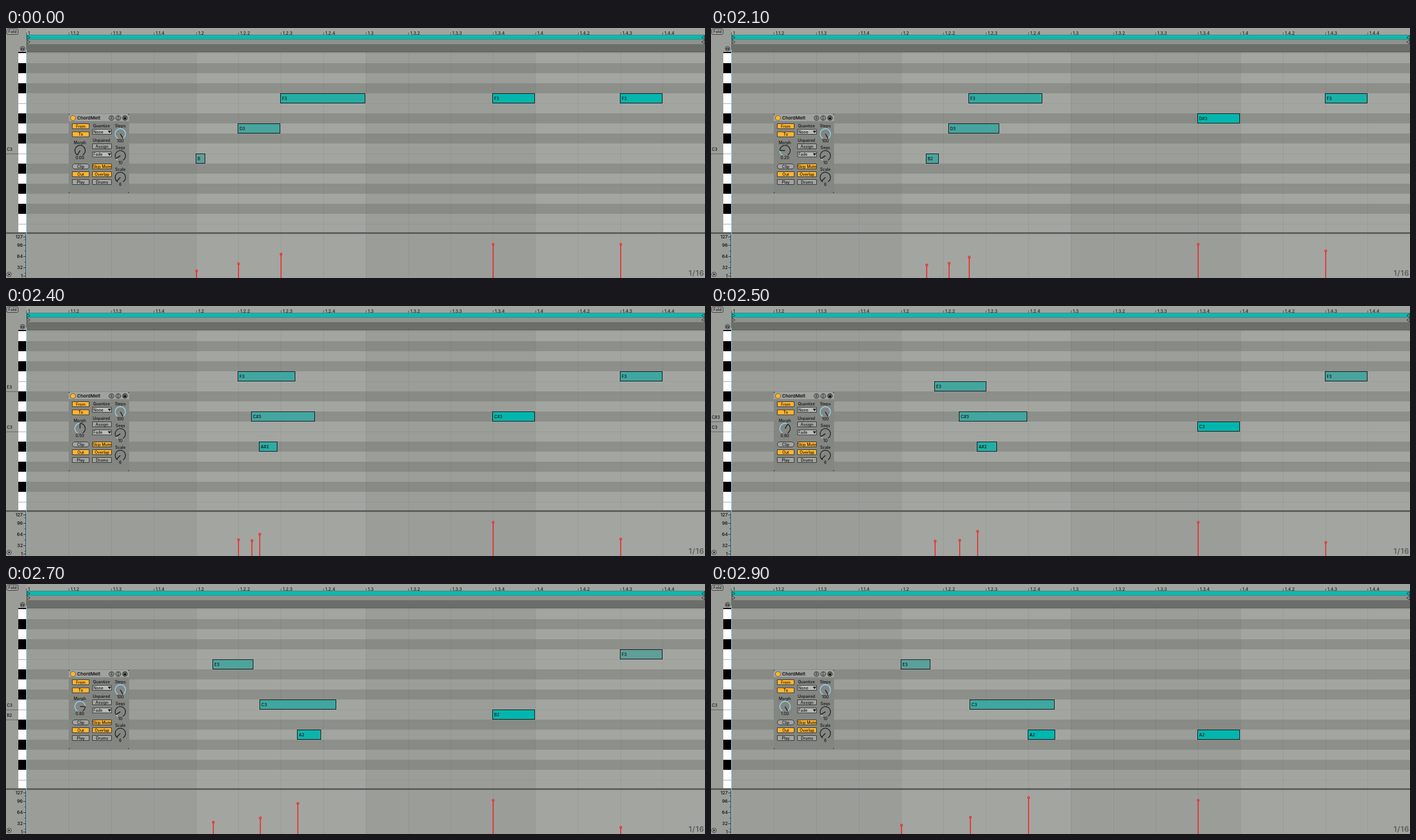
These frames come from a looping animation (1249 px wide and 448 px high, 5900 ms). An HTML page with a canvas:

```html
<!DOCTYPE html>
<html lang="en">
<head>
<meta charset="utf-8">
<title>Piano roll morph</title>
<style>
html, body { margin: 0; width: 100%; height: 100%; overflow: hidden; background: #9b9d99; }
canvas { display: block; }
</style>
</head>
<body>
<canvas id="stage" width="1249" height="448"></canvas>
<script>
const W = 1249, H = 448, LOOP = 5900;
const LEFT = 36, STEP = 75.8, ROW = 18;
const TEAL = '#00bdb2', ORANGE = '#ffb532', BLUE = '#8fd8f5', INK = '#111';
const NAMES = ['C', 'C#', 'D', 'D#', 'E', 'F', 'F#', 'G', 'G#', 'A', 'A#', 'B'];
const c = document.getElementById('stage').getContext('2d');

// Each property holds [start, end] of the morph.
const notes = [
  { x: [339.6, 566.7], w: [16, 48], pitch: [59, 57], vel: [22, 106] },
  { x: [415.2, 463.3], w: [75, 151], pitch: [62, 60], vel: [42.5, 49.5] },
  { x: [491, 339.6], w: [151, 52], pitch: [65, 64], vel: [70, 27] },
  { x: [870.4, 870.4], w: [75, 75], pitch: [65, 57], vel: [98.5, 98.5] },
  { x: [1097.8, 1097.8], w: [75, 75], pitch: [65, 65], vel: [98.5, 1.5], fades: true }
];
// Extra key label shown at some morph steps.
const hoverKeys = { 1: 66, 5: 64, 6: 61, 8: 59 };

const mix = ([a, b], m) => a + (b - a) * m;
const keyY = pitch => 207 - ROW * (pitch - 60);
const isBlack = pitch => NAMES[pitch % 12].length > 1;
const keyName = pitch => NAMES[pitch % 12] + (Math.floor(pitch / 12) - 2);

function box(x, y, w, h, color) {
  c.fillStyle = color;
  c.fillRect(x, y, w, h);
}

function text(s, x, y, size = 7.3, align = 'left', color = INK, weight = 500) {
  c.font = `${weight} ${size}px Inter, sans-serif`;
  c.textAlign = align;
  c.textBaseline = 'alphabetic';
  c.fillStyle = color;
  c.fillText(s, x, y + size * 0.36);
}

function path(points, color, width = 1, close = false) {
  c.beginPath();
  points.forEach(([x, y]) => c.lineTo(x, y));
  if (close) c.closePath();
  c.strokeStyle = color;
  c.lineWidth = width;
  c.stroke();
}

function arc(x, y, r, from, to, color, width = 1) {
  c.beginPath();
  c.arc(x, y, r, from, to);
  c.strokeStyle = color;
  c.lineWidth = width;
  c.stroke();
}

function disc(x, y, r, fill, stroke, width = 1) {
  c.beginPath();
  c.arc(x, y, r, 0, 7);
  c.fillStyle = fill;
  c.fill();
  if (stroke) arc(x, y, r, 0, 7, stroke, width);
}

function pill(x, y, w, h, r, fill) {
  c.beginPath();
  c.roundRect(x + 0.5, y + 0.5, w - 1, h - 1, r);
  c.fillStyle = fill;
  c.fill();
  c.strokeStyle = '#333';
  c.lineWidth = 1;
  c.stroke();
}

function drawRuler() {
  box(LEFT, 0, W, 13, '#a2a4a0');
  for (let i = 0; i < 16; i++) {
    const x = Math.round(LEFT + 0.4 + i * STEP), beat = (i >> 2) + 1, sub = i % 4 + 1;
    const label = i === 0 ? '1' : sub === 1 ? `1.${beat}` : `1.${beat}.${sub}`;
    box(x, 8, 1, 5, '#555');
    text(label, x + 3.5, 8.8, 7.8, 'left', '#222');
  }
  box(LEFT, 13, W, 8, TEAL);
  box(LEFT, 12, W, 1, '#70736f');
  box(LEFT, 21, W, 8, '#8f918d');
  box(LEFT, 29, W, 14, '#6c6e6a');
  box(LEFT, 20, W, 1, '#70736f');
  box(LEFT, 42, W, 1, '#595b58');
  for (const y of [13.5, 21.5]) {
    path([[37.5, y], [43, y + 3.5], [37.5, y + 7]], '#333', 1, true);
    path([[1248.5, y], [1243, y + 3.5], [1248.5, y + 7]], '#333', 1, true);
  }
}

function drawGrid() {
  for (let beat = 0; beat < 4; beat++) {
    const x = Math.round(LEFT + 0.4 + beat * 4 * STEP), light = beat % 2;
    box(x, 43, 305, H - 43, light ? '#a3a5a1' : '#9b9d99');
    for (let p = 53; p <= 70; p++) {
      if (!isBlack(p)) continue;
      const top = Math.max(43, keyY(p));
      box(x, top, 305, keyY(p) + ROW - top, light ? '#8d8f8b' : '#888a86');
    }
  }
  for (let i = 1; i < 16; i++) box(Math.round(LEFT + 0.4 + i * STEP), 43, 1, H - 43, 'rgba(0,0,0,.06)');
  for (const y of [135, 225, 351]) box(LEFT, y, W, 1, 'rgba(0,0,0,.05)');
}

function drawKeyLabel(pitch) {
  text(keyName(pitch), 1.5, keyY(pitch) + 10);
  box(0, keyY(pitch) + ROW, 22, 1, '#60625f');
}

function drawKeys(step) {
  box(0, 0, LEFT, H, '#9b9d99');
  box(22, 43, 14, 323, '#fff');
  for (let p = 53; p <= 70; p++) {
    if (!isBlack(p)) continue;
    const top = Math.max(43, keyY(p));
    box(22, top, 14, keyY(p) + ROW - top, '#000');
  }
  for (const y of [135, 225, 351]) box(22, y, 14, 1, '#aaa');
  drawKeyLabel(60);
  if (hoverKeys[step]) drawKeyLabel(hoverKeys[step]);
  pill(1, 1, 21, 11, 2, '#a6a8a4');
  text('Fold', 11.5, 6.5, 7.3, 'center');
  arc(29.5, 37, 4, 0, 7, '#333');
  arc(29.5, 37.5, 2, Math.PI, 0, '#222');
  box(27, 37, 2, 2, '#222');
  box(30, 37, 2, 2, '#222');
}

function drawVelocityAxis() {
  box(0, 366, W, 3, '#5b5d5a');
  for (const [v, y] of [[127, 374], [96, 389.5], [64, 409.5], [32, 429.5], [1, 444.5]]) {
    text(v, 30, y, 8.2, 'right');
    box(31, Math.floor(y), 5, 1, '#333');
  }
  for (const y of [379, 399, 419, 439]) box(33, y, 3, 1, '#444');
  box(35, 370, 1, H, '#333');
  disc(5.5, 441.5, 4, '#a6a8a4', '#333');
  c.beginPath();
  c.moveTo(4.3, 439.3);
  c.lineTo(7.8, 441.5);
  c.lineTo(4.3, 443.7);
  c.fillStyle = INK;
  c.fill();
}

function knob(x, y, value, color = BLUE) {
  const from = Math.PI * 2 / 3, sweep = Math.PI * 5 / 3, a = from + sweep * value;
  arc(x, y, 9.3, a, from + sweep, '#1c1c1c', 1.3);
  if (value > 0) arc(x, y, 9.3, from, a, color, 1.5);
  path([[x, y], [x + 9.5 * Math.cos(a), y + 9.5 * Math.sin(a)]], '#1c1c1c', 1.5);
}

function button(label, x, y, w, fill, r = 0) {
  pill(x, y, w, 10, r, fill);
  text(label, x + w / 2, y + 5.2, 7, 'center');
}

function dropdown(label, y) {
  pill(154, y, 35, 10, 0, '#b9bbb7');
  text(label, 156, y + 5.2, 7);
  c.beginPath();
  c.moveTo(182, y + 3);
  c.lineTo(188, y + 3);
  c.lineTo(185, y + 7.5);
  c.fillStyle = INK;
  c.fill();
}

function drawDevice(m) {
  const gray = '#a3a5a1';
  box(112, 154, 108, 142, '#848682');
  box(112, 154, 108, 13, '#a0a29e');
  for (const x of [112, 218]) for (const y of [154, 294]) box(x, y, 2, 2, '#555');
  disc(119.7, 161.3, 4.5, ORANGE, '#5c4b20', 0.8);
  text('ChordMelt', 127, 161.3, 8.2, 'left', INK, 600);

  for (const x of [188.5, 200.5, 212.5]) arc(x, 161.3, 4.3, 0, 7, '#222');
  box(186.5, 159, 4, 1.2, INK);
  box(186.5, 162, 4, 1.2, INK);
  arc(200.5, 161.3, 2, 0.6, 2.7, INK, 1.1);
  arc(200.5, 161.3, 2, 3.7, 5.8, INK, 1.1);
  box(210, 158.5, 5, 5.5, INK);
  box(211.5, 159, 2, 1.5, gray);

  button('From', 118, 171, 31, ORANGE);
  button('To', 118, 185.5, 31, ORANGE);
  button('Clip', 118, 243, 31, gray, 4.5);
  button('Out', 118, 257, 31, ORANGE);
  button('Play', 118, 271, 31, gray);
  button('Assign', 154, 207, 35, gray);
  button('Skip Mute', 154, 243, 35, ORANGE);
  button('Overlap', 154, 257, 35, ORANGE);
  button('Drums', 154, 271, 35, gray);
  dropdown('None', 181);
  dropdown('Fade', 221.5);

  const labels = [
    ['Quantize', 170.5, 175.3], ['Unpaired', 170.5, 201.3],
    ['Morph', 132, 205], [m.toFixed(2), 132, 232.5],
    ['Steps', 204.3, 175.3], ['100', 204.3, 202.7],
    ['Seqs', 204.3, 214.2], ['10', 204.3, 241.7],
    ['Scale', 204.3, 253], ['6', 204.3, 280.7]
  ];
  for (const [s, x, y] of labels) text(s, x, y, 7.1, 'center');
  knob(132.3, 219.5, m);
  knob(204.3, 189.7, 1);
  knob(204.3, 229, 0.09);
  knob(204.3, 267.7, 0.05, '#1c1c1c');
}

function drawNote(note, m) {
  if (note.fades && m === 1) return;
  const x = Math.round(mix(note.x, m)), w = Math.round(mix(note.w, m));
  const pitch = Math.round(mix(note.pitch, m)), vel = mix(note.vel, m);
  const y = keyY(pitch), name = keyName(pitch), v = Math.min(vel, 100);
  box(x - 1, y, w + 1, 17, `rgb(${121 - 1.2 * v},${152 + 0.3 * v},${147 + 0.26 * v})`);
  c.strokeStyle = '#111';
  c.lineWidth = 1;
  c.strokeRect(x - 0.5, y + 0.5, w, 17);
  text(w < 18 ? name[0] : name, x + 2.3, y + 9.5);

  const top = 449 - 0.625 * vel;
  box(x - 0.3, top + 1.5, 1.5, H, '#f91411');
  disc(x + 0.5, top, 1.7, '#c98a86', '#f91411', 1.2);
}

function frame(now) {
  const t = now % LOOP;
  const step = t < 2000 ? 0 : Math.min(10, Math.floor((t - 2000) / 100) + 1);
  const m = step / 10;
  drawGrid();
  drawKeys(step);
  drawRuler();
  drawVelocityAxis();
  box(36, 39, 1, H, '#7fd6ee');
  notes.forEach(note => drawNote(note, m));
  drawDevice(m);
  c.letterSpacing = '1px';
  text('1/16', 1248, 439.5, 13, 'right', '#595b58', 600);
  c.letterSpacing = '0px';
  requestAnimationFrame(frame);
}
requestAnimationFrame(frame);
</script>
</body>
</html>
```
